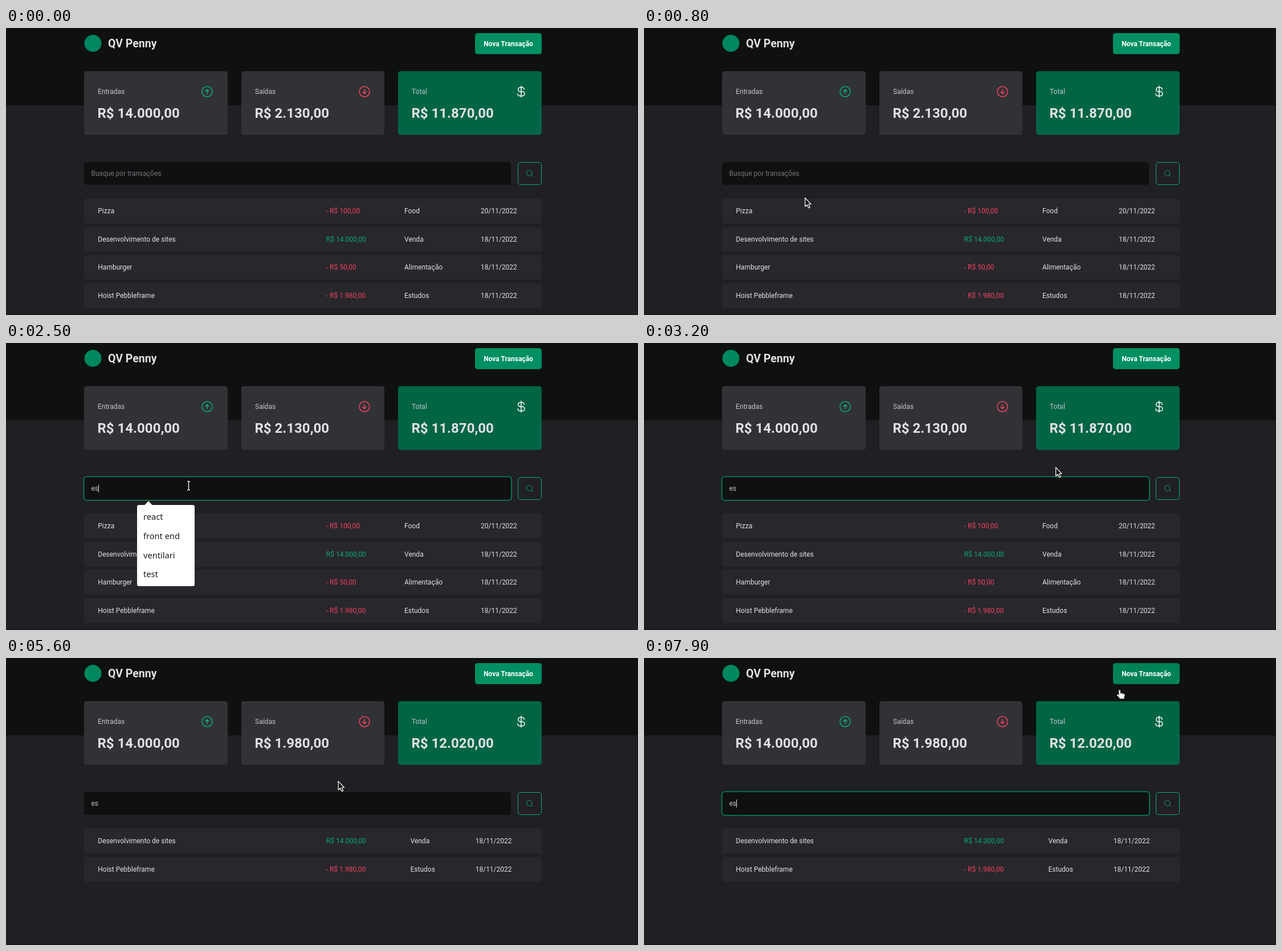
Animation of 1109x505 px, one loop 8000 ms. Source, as an HTML page:

```html
<!DOCTYPE html>
<html lang="pt-BR">
<head>
<meta charset="utf-8">
<title>QV Penny</title>
<style>
  html, body { margin: 0; width: 100%; height: 100%; overflow: hidden; background: #201f24; }
  svg { display: block; width: 1109px; height: 505px; }
  text { font-family: Roboto, sans-serif; font-size: 12px; fill: #e1e1e6; white-space: pre; }
  .label { fill: #c4c4cc; }
  .value { font-size: 24px; font-weight: 700; }
  .hint { fill: #74747f; }
  .plus { fill: #08ab7a; }
  .minus { fill: #f2425f; }
  .option { font: 14.6px "Noto Sans", sans-serif; fill: #1c1c1e; }
  .tiny { font-size: 3.9px; font-weight: 500; fill: #c8c6d0; }
  .icon { fill: none; stroke-width: 16; stroke-linecap: round; stroke-linejoin: round; }
</style>
</head>
<body>
<svg id="stage" viewBox="0 0 1109 505" xmlns="http://www.w3.org/2000/svg"></svg>
<script>
const LOOP = 8000, STEP = 100;
const stage = document.getElementById('stage');

function add(parent, tag, attrs = {}, content = '') {
  const el = document.createElementNS('http://www.w3.org/2000/svg', tag);
  for (const k in attrs) el.setAttribute(k, attrs[k]);
  el.textContent = content;
  parent.appendChild(el);
  return el;
}
const group = (parent = stage, attrs) => add(parent, 'g', attrs);
const rect = (parent, x, y, width, height, fill, rx = 0, more = {}) =>
  add(parent, 'rect', { x, y, width, height, fill, rx, ...more });
const text = (parent, x, y, str, cls = '', more = {}) =>
  add(parent, 'text', { x, y, class: cls, ...more }, str);
const path = (parent, d, attrs) => add(parent, 'path', { d, ...attrs });
const icon = (parent, x, y, size, stroke, d) =>
  path(parent, d, { class: 'icon', stroke, transform: `translate(${x} ${y}) scale(${size / 256})` });
const show = (el, on) => el.setAttribute('visibility', on ? 'inherit' : 'hidden');

// Page frame and header
rect(stage, 0, 0, 1109, 505, '#201f24');
rect(stage, 0, 0, 1109, 136, '#0f1110');
path(stage, 'M1108.5 0V504.5H0', { fill: 'none', stroke: '#131316' });
add(stage, 'circle', { cx: 152.5, cy: 27, r: 15, fill: '#00875f' });
text(stage, 179, 34, 'QV Penny', '', { style: 'font-size:19.5px;font-weight:700' });
const newButton = rect(stage, 823, 9, 117, 37, '#008f62', 4.5);
text(stage, 881.5, 32, 'Nova Transação', '', { 'text-anchor': 'middle', style: 'font-weight:700;fill:#fff' });

// Summary cards
const ring = 'M32 128a96 96 0 1 0 192 0a96 96 0 1 0 -192 0';
const dollar = 'M128 24V232M184 88a40 40 0 0 0-40-40H112a40 40 0 0 0 0 80h40a40 40 0 0 1 0 80H104a40 40 0 0 1-40-40';
function card(x, w, fill, label, value, stroke, d) {
  rect(stage, x, 76, w, 112, fill, 4.5);
  text(stage, x + 24, 116, label, 'label');
  icon(stage, x + 204, 100, 24, stroke, d);
  return text(stage, x + 23.5, 158, value, 'value');
}
card(137, 252, '#313236', 'Entradas', 'R$ 14.000,00', '#08ab7a', ring + 'M94 122L128 88L162 122M128 168V88');
const outgo = card(413, 251, '#313236', 'Saídas', '', '#f2425f', ring + 'M94 134L128 168L162 134M128 88V168');
const total = card(688, 252, '#006545', 'Total', '', '#fff', dollar);

// Search form
rect(stage, 137, 236, 749, 40, '#0f1110', 4.5);
const focusRing = rect(stage, 136.6, 235.3, 750.6, 41.4, 'none', 5, { stroke: '#00875f', 'stroke-width': 1.6 });
const field = text(stage, 149.5, 260, '');
const caret = rect(stage, 150, 249, 1, 14, '#e1e1e6');
const searchGroup = group();
const searchButton = rect(searchGroup, 898.5, 236.5, 41, 39, 'none', 4.5, { stroke: '#08ab7a' });
const searchIcon = icon(searchGroup, 911.5, 248.5, 15, '#08ab7a',
  'M32 116a84 84 0 1 0 168 0a84 84 0 1 0 -168 0M175.4 175.4L224 224');

// Transactions
const deals = [
  ['Pizza', '- R$ 100,00', 'Food', '20/11/2022'],
  ['Desenvolvimento de sites', 'R$ 14.000,00', 'Venda', '18/11/2022'],
  ['Hamburger', '- R$ 50,00', 'Alimentação', '18/11/2022'],
  ['Hoist Pebbleframe', '- R$ 1.980,00', 'Estudos', '18/11/2022']
];
function table(rows, typeX, dateX) {
  const g = group();
  rows.forEach(([name, price, type, date], i) => {
    const y = Math.round(300 + 49.6 * i);
    rect(g, 137, y, 803, 44, '#28272c', 4.5);
    text(g, 161.3, y + 26, name);
    text(g, 561.8, y + 26, price, price[0] === '-' ? 'minus' : 'plus');
    text(g, typeX, y + 26, type);
    text(g, dateX, y + 26, date);
  });
  return g;
}
const allDeals = table(deals, 699, 833);
const foundDeals = table([deals[1], deals[3]], 709.5, 823.7);

// Suggestion lists
function popup(options, w) {
  const g = group();
  path(g, 'M243 285.5L250 278L257 285.5Z', { fill: '#fff' });
  rect(g, 230, 285, w, 33.6 * options.length + 8.4, '#fff', 3);
  options.forEach((o, i) => text(g, 241, 311.3 + 33.6 * i, o, 'option'));
  return g;
}
const popups = [
  popup(['react', 'front end', 'c# lutra', 'ventilari', 'test', 'dwdw'], 101),
  popup(['react', 'front end', 'ventilari', 'test'], 101),
  popup(['test'], 45)
];

// Lesson window that shrinks into the corner
function lessonWindow() {
  const g = group();
  rect(g, -230, -70, 379, 200, '#17161b', 4);
  rect(g, -230, -70, 379, 76, '#101013', 4);
  ['Início', 'Explorar', 'Editar', 'Mais'].forEach((s, i) =>
    text(g, [0, 16, 38, 56][i], 2.6, s, 'tiny', { opacity: 0.7 }));
  icon(g, 139.5, -1.5, 6, '#d0d0d6', 'M32 116a84 84 0 1 0 168 0a84 84 0 1 0 -168 0M175 175L224 224');
  rect(g, -230, 32, 306, 94, '#2b0846');
  rect(g, -230, 32, 306, 4, '#6d1594');
  let seed = 7;
  const rnd = () => (seed = seed * 16807 % 2147483647) / 2147483647;
  for (let i = 0; i < 420; i++) {
    const hue = 270 + rnd() * 30, light = 14 + rnd() * 22;
    rect(g, rnd() * 74, 36 + Math.floor(rnd() * 44) * 2, 1 + rnd() * 3, 0.9, `hsl(${hue} 70% ${light}%)`);
  }
  for (let i = 0; i < 9; i++) rect(g, 0, 58 + i * 5, 8 + rnd() * 22, 0.8, '#a59ab5', 0, { opacity: 0.55 });
  rect(g, 83, 32, 66, 94, '#111114');
  add(g, 'circle', { cx: 92, cy: 41, r: 4.8, fill: 'none', stroke: '#08ab7a' });
  rect(g, 90.5, 40.5, 3, 1, '#c8c6d0');
  text(g, 102, 40.5, 'Estrutura visual', 'tiny', { style: 'font-weight:700;fill:#fff' });
  text(g, 102, 45, '10 aulas · 1h 20min', 'tiny', { style: 'font-size:2.8px' });
  rect(g, 87, 46, 62, 8, '#8d0fa6');
  for (let i = 0; i < 40; i++) rect(g, 87 + rnd() * 60, 46 + rnd() * 7, 1.5, 1, rnd() < 0.5 ? '#c21ad0' : '#5c0a78');
  rect(g, 91.7, 57, 0.6, 68, '#0b6b4e');
  ['Introdução', 'Projeto QV Penny', 'Setup do projeto', 'Componente: Header', 'Componente: Summary',
   'Tabela de transações', 'Componente: SearchForm', 'Criando um modal acessível'].forEach((s, i) => {
    const y = 59 + i * 8.9;
    add(g, 'circle', { cx: 92, cy: y, r: 1.5, fill: '#08ab7a' });
    rect(g, 97.5, y - 1.3, 2.6, 2.6, 'none', 0.5, { stroke: '#a9a7b0', 'stroke-width': 0.5 });
    text(g, 102, y + 1.4, s, 'tiny');
  });
  rect(g, -230, 126, 379, 4, '#141317', 3);
  return g;
}
const lesson = lessonWindow();

// Pointers, each drawn around its hot spot
const outline = { 'stroke-linejoin': 'round', 'stroke-linecap': 'round' };
const pointers = { arrow: group(), hand: group(), beam: group() };
path(pointers.arrow, 'M.6 .8V16.2L4 13L6.7 18.6L9.2 17.4L6.6 12H11Z',
  { ...outline, fill: '#151515', stroke: '#fff', 'stroke-width': 1.2 });
path(pointers.hand, 'M-1.7 1.6A1.7 1.7 0 0 1 1.7 1.6V5.4L7.6 6.6Q9.8 7.2 9.5 9.4L8.4 13.4V16H-.4V14.2L-5 9.8Q-5.4 7.4 -3.4 7.8L-1.7 9Z',
  { ...outline, fill: '#fff', stroke: '#111', 'stroke-width': 0.8 });
path(pointers.hand, 'M1.8 6V8.6M4.4 6.4V8.8M7 7V9', { stroke: '#555', 'stroke-width': 0.6 });
const beam = 'M-2.5 -7.5H-1Q0 -7.5 0 -6.5Q0 -7.5 1 -7.5H2.5M0 -6.5V6.5M-2.5 7.5H-1Q0 7.5 0 6.5Q0 7.5 1 7.5H2.5';
path(pointers.beam, beam, { ...outline, fill: 'none', stroke: '#000', 'stroke-width': 3 });
path(pointers.beam, beam, { fill: 'none', stroke: '#fff', 'stroke-width': 1.4 });

// Tables of steps: [start time, value...]
const lessonSteps = [[0, 0], [100, 2], [200, 1.5], [300, 1], [400, 0.6], [500, 0]];
const pointerSteps = [
  [0, ''], [500, 'arrow', 30, 150], [600, 'arrow', 120, 240], [700, 'arrow', 215, 300],
  [800, 'arrow', 282, 298], [900, 'beam', 312, 267], [1000, 'beam', 320.5, 251],
  [3000, 'beam', 440, 249], [3100, 'arrow', 590, 228], [3200, 'arrow', 722, 218],
  [3300, 'arrow', 812, 226], [3400, 'arrow', 872, 240], [3500, 'hand', 912, 254],
  [3600, 'hand', 930, 261], [3900, 'hand', 936, 263], [4400, 'hand', 938, 263.5],
  [5200, 'arrow', 890, 246], [5300, 'arrow', 812, 226], [5400, 'arrow', 728, 213],
  [5500, 'arrow', 648, 209], [5600, 'arrow', 582.5, 216], [5700, 'arrow', 546, 228],
  [5800, 'beam', 526, 246], [5900, 'beam', 515, 259], [6000, 'beam', 511.5, 269],
  [6400, 'beam', 511.5, 265], [6500, 'beam', 511.5, 261], [7200, 'beam', 570, 246],
  [7300, 'arrow', 650, 214], [7400, 'arrow', 729, 183], [7600, 'arrow', 800, 106],
  [7700, 'hand', 858, 40], [7800, 'hand', 862, 28], [7900, 'hand', 834.5, 56]
];
const typed = [[0, ''], [2200, 'e'], [2500, 'es']];
const focused = [[0, 0], [1400, 1], [3900, 0], [6900, 1]];
const caretSteps = [
  [0, 0], [1400, 150], [1900, 0], [2200, 156], [2500, 162], [3000, 0],
  [3500, 162], [3900, 0], [6900, 162], [7400, 0], [7900, 162]
];
const popupSteps = [[0, -1], [1400, 0], [2500, 1], [2600, 2], [2800, -1]];
const searchHover = [[0, 0], [3500, 0.5], [3600, 1], [3900, 0], [4500, 0.5], [4600, 1], [5200, 0.5], [5300, 0]];
const newHover = [[0, 0], [7700, 0.3], [7800, 0.8], [7900, 0.3]];

const at = (steps, t) => steps.filter(s => s[0] <= t).pop().slice(1);
const mix = (a, b, k) => `rgb(${a.map((v, i) => Math.round(v + (b[i] - v) * k))})`;

function draw(t) {
  const [scale] = at(lessonSteps, t);
  show(lesson, scale > 0);
  lesson.setAttribute('transform', `translate(-23 -66) scale(${scale || 1}) translate(23 66)`);

  const [word] = at(typed, t);
  field.textContent = word || 'Busque por transações';
  field.setAttribute('class', word ? 'label' : 'hint');
  show(focusRing, at(focused, t)[0]);
  const [caretX] = at(caretSteps, t);
  show(caret, caretX);
  caret.setAttribute('x', caretX);
  const [open] = at(popupSteps, t);
  popups.forEach((p, i) => show(p, i === open));

  const found = t >= 4400;
  show(allDeals, !found);
  show(foundDeals, found);
  outgo.textContent = found ? 'R$ 1.980,00' : 'R$ 2.130,00';
  total.textContent = found ? 'R$ 12.020,00' : 'R$ 11.870,00';

  const [hover] = at(searchHover, t);
  searchButton.setAttribute('fill', mix([32, 31, 36], [0, 135, 95], hover));
  searchButton.setAttribute('stroke', mix([8, 171, 122], [0, 135, 95], hover));
  searchIcon.setAttribute('stroke', mix([8, 171, 122], [255, 255, 255], hover));
  searchGroup.setAttribute('opacity', t >= 3900 && t < 4400 ? 0.7 : 1);
  newButton.setAttribute('fill', mix([0, 143, 98], [1, 98, 69], at(newHover, t)[0]));

  const [kind, x, y] = at(pointerSteps, t);
  for (const k in pointers) show(pointers[k], k === kind);
  if (kind) pointers[kind].setAttribute('transform', `translate(${x} ${y})`);
}

function tick() {
  draw(Math.floor(performance.now() % LOOP / STEP) * STEP);
  requestAnimationFrame(tick);
}
tick();
</script>
</body>
</html>
```
